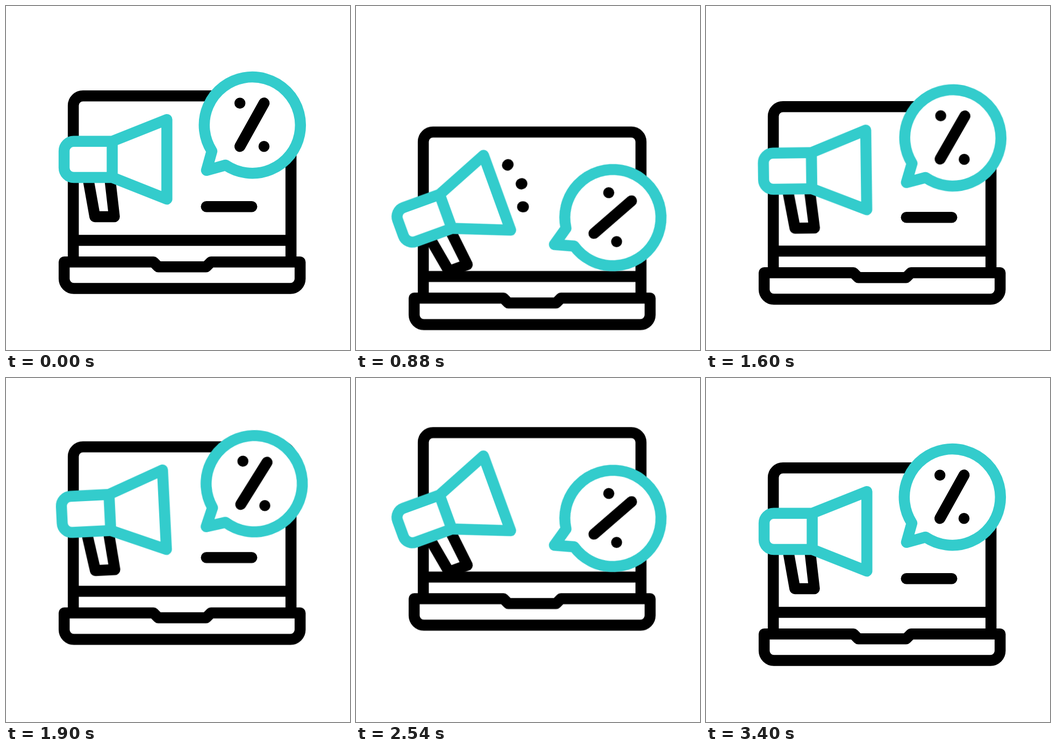
An HTML page without scripts that plays this animation: 640x640 px, repeating every 3.62 s.

```html
<!DOCTYPE html>
<html lang="en">
<head>
<meta charset="utf-8">
<title>Laptop promotion</title>
<style>
  html, body { margin: 0; width: 100%; height: 100%; overflow: hidden; background: #fff; }
  svg { display: block; width: 100vw; height: 100vh; }

  svg * { transform-box: view-box; }
  path { fill: none; stroke: #000; stroke-width: 20.5; stroke-linecap: round; stroke-linejoin: round; }
  .solid { fill: #fff; }
  .accent { stroke: #3cc; }

  .scene, .megaphone, .bubble {
    animation: 3.62s cubic-bezier(.3333, 0, .6667, 1) infinite;
  }
  .scene { animation-name: bob; }
  .megaphone { animation-name: swing; transform-origin: 200px 305px; --tilt: translate(-24.2px, 27.7px) rotate(-20deg); }
  .bubble { animation-name: swing; transform-origin: 373px 306px; --tilt: translate(-4px, 71px) rotate(20deg); }
  .rays { animation: shoot 3.62s linear infinite; }

  @keyframes bob {
    0%, 93.923%, 100% { transform: translateY(0); }
    31.308% { transform: translateY(77px); }
    62.615% { transform: translateY(-77px); }
  }
  @keyframes swing {
    0%, 46.961%, 93.923%, 100% { transform: translate(0px, 0px) rotate(0deg); }
    23.481%, 70.442% { transform: var(--tilt); }
  }
  /* Each dash leaves the horn, stretches and closes up at its outer end. */
  @keyframes shoot {
    0%, 23.47%, 36.2%, 70.43%, 83.16%, 100% { opacity: 0; }
    23.48%, 70.44% { opacity: 1; stroke-dasharray: 0 99; stroke-dashoffset: 0; }
    25.97%, 72.93% { stroke-dasharray: 4.2 99; stroke-dashoffset: 0; }
    28.59%, 75.55% { stroke-dasharray: 9.4 99; stroke-dashoffset: -4.6; }
    31.08%, 78.04% { stroke-dasharray: 9.4 99; stroke-dashoffset: -14; }
    33.7%, 80.66% { stroke-dasharray: 4.1 99; stroke-dashoffset: -23.9; }
    36.19%, 83.15% { opacity: 1; stroke-dasharray: 0 99; stroke-dashoffset: -28; }
  }
</style>
</head>
<body>
<svg viewBox="0 0 640 640">
  <g class="scene">
    <g class="laptop">
      <path d="M125.2 476V185.2a18 18 0 0 1 18-18H512.2a18 18 0 0 1 18 18V476M125.2 436H530.2"/>
      <path class="solid" d="M108.2 476.2H274.3L283.3 485.3H372.3L381.3 476.2H547.2V507.4a18 18 0 0 1-18 18H126.2a18 18 0 0 1-18-18Z"/>
      <path d="M372.8 373.2H457.2"/>
    </g>

    <g class="megaphone">
      <g class="rays">
        <path d="M335 243.5L361 233"/>
        <path d="M347 285H375"/>
        <path d="M335 326L361 336.5"/>
      </g>
      <path class="solid" d="M152.5 320L165.4 392H201.5L193.2 320"/>
      <path class="solid accent" d="M197.6 251.7H126.1a18 18 0 0 0-18 18V300.9a18 18 0 0 0 18 18H197.6L299.3 359.3V211.2L197.6 251.7V318.9"/>
    </g>

    <g class="bubble">
      <path class="solid accent" d="M383 270A89.5 89.5 0 1 1 408.5 296L373 305.8Z"/>
      <path d="M480.2 180.6L435.2 261.2M435.2 180.7h.01M480 261.2h.01"/>
    </g>
  </g>
</svg>
</body>
</html>
```
